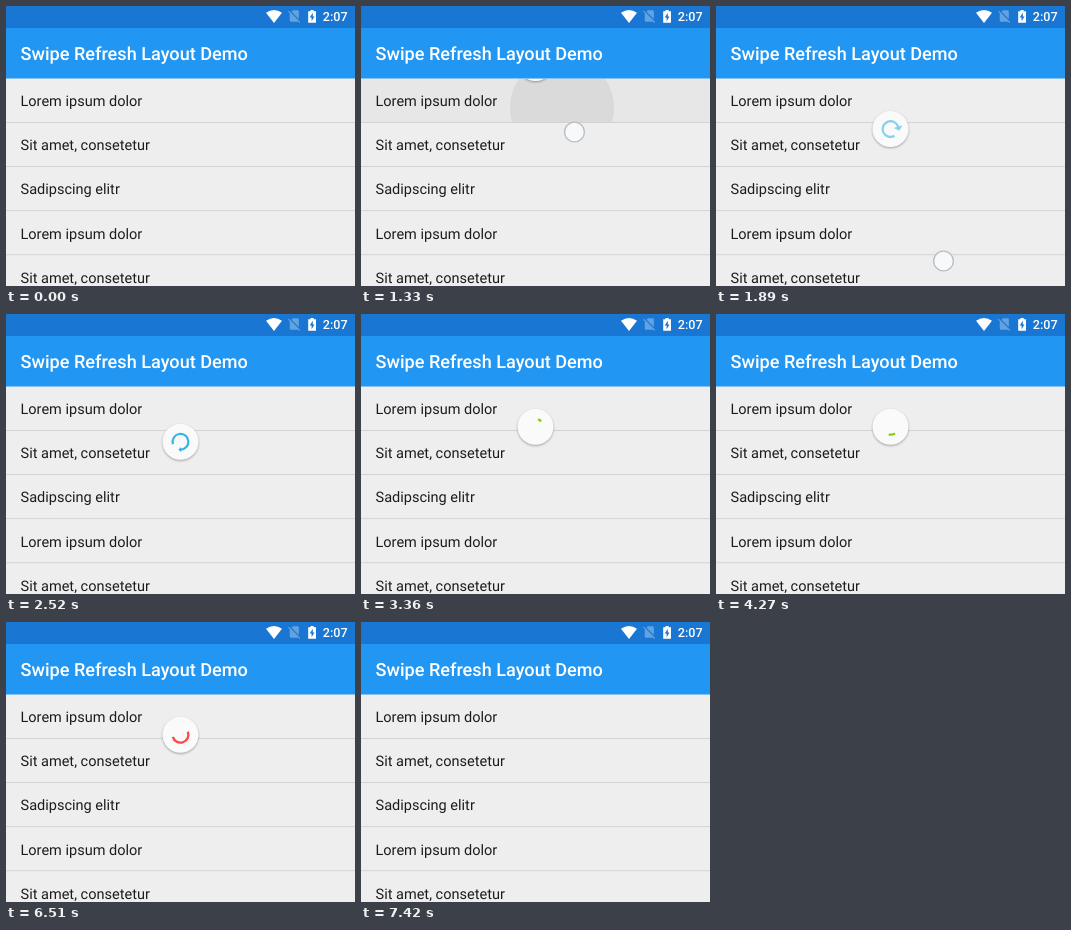
Recreate the animation shown at these times as an HTML page. Size 349x280 px, loop 8120 ms.

```html
<!DOCTYPE html>
<html lang="en">
<head>
<meta charset="utf-8">
<title>Swipe refresh</title>
<style>
  html, body { margin: 0; width: 100%; height: 100%; overflow: hidden; background: #eee; }
  svg { display: block; width: 100%; height: 100%; }
  text { font-family: Roboto, "Noto Sans", sans-serif; text-rendering: geometricPrecision; }
  .disc { filter: drop-shadow(0 1px 1px rgba(0, 0, 0, .32)); }
</style>
</head>
<body>
<svg viewBox="0 0 349 280">
  <defs>
    <clipPath id="listClip"><rect y="73" width="349" height="207"/></clipPath>
    <clipPath id="rowClip"><rect y="73" width="349" height="43"/></clipPath>
  </defs>
  <rect width="349" height="280" fill="#eee"/>
  <g id="press" clip-path="url(#rowClip)">
    <rect y="73" width="349" height="43" fill="#e7e7e7"/>
    <circle cx="201" cy="102" r="52" fill="#dadada"/>
  </g>
  <g id="rows" font-size="14.54" fill="#1c1c1c"></g>
  <g clip-path="url(#listClip)">
    <g id="spinner">
      <circle class="disc" r="18" fill="#fafafa"/>
      <g id="mark">
        <path id="arc" fill="none" stroke-width="2.25"/>
        <path id="arrow" d="M-4.5 0H4.5L0 4.5Z"/>
      </g>
    </g>
  </g>
  <rect y="22" width="349" height="50.5" fill="#2196f3"/>
  <rect width="349" height="22" fill="#1976d2"/>
  <text x="14.6" y="54.2" font-size="18.1" font-weight="500" fill="#fff">Swipe Refresh Layout Demo</text>
  <g fill="#fff">
    <path d="M268 17L260 6.7Q268 1.2 276 6.7Z"/>
    <path transform="translate(280.5 2.2) scale(.65)" opacity=".32"
      d="M19 5Q19 3 17 3H10L7.7 5.3L19 16.7ZM3.7 3.9L2.4 5.2L5 7.8V19Q5 21 7 21H17L18 20.7L19.9 22.6L21.1 21.4Z"/>
    <path d="M304.5 4H307.7V5.2H310V16.8H302.2V5.2H304.5Z"/>
    <path d="M306.8 6.8L303.7 11.6H305.6V15.2L308.5 10.4H306.8Z" fill="#1976d2"/>
    <text x="316.8" y="15.1" font-size="12.6" font-weight="500">2:07</text>
  </g>
  <circle id="touch" r="9.9" fill="#f8f9fa" fill-opacity=".9" stroke="#b8bfca" stroke-width="1.4"/>
</svg>
<script>
const LOOP = 8120, STEP = 70, TOUCH_DOWN = 1190;
const ROW = 44.1;
const HOME = 55, REST = 112.8, TRAVEL = REST - HOME;
const RELEASE = 2400, FINISH = 2690, SPIN = 3290, CYCLE = 1212;
const SHRINK = 7260, GONE = 7420;
const RADIUS = 7.9, SWEEP = 288, MIN_ARC = 16;
const COLORS = ["#33b5e5", "#88c80c", "#ffa63c", "#ff4444"];
const ROWS = ["Lorem ipsum dolor", "Sit amet, consetetur", "Sadipscing elitr"];
// time, x, y of the finger
const FINGER = [[1190, 212.5, 105.5], [1260, 212.5, 105.5], [1330, 213.5, 126],
  [1890, 227.5, 255], [2030, 229.5, 279], [2170, 229.5, 279], [2310, 229.5, 320]];

const $ = id => document.getElementById(id);
const clamp = v => Math.min(1, Math.max(0, v));
const mix = (a, b, u) => a + (b - a) * u;
const show = (el, on) => el.setAttribute("visibility", on ? "visible" : "hidden");

$("rows").innerHTML = Array.from({ length: 5 }, (_, i) =>
  `<text x="14.5" y="${100.2 + ROW * i}">${ROWS[i % 3]}</text>` +
  `<rect y="${116 + ROW * i}" width="349" height=".9" fill="#d1d1d1"/>`).join("");

// cubic-bezier(.4, 0, .2, 1)
function ease(x) {
  x = clamp(x);
  let lo = 0, hi = 1;
  for (let i = 0; i < 20; i++) {
    const u = (lo + hi) / 2, v = 1 - u;
    if (1.2 * v * v * u + 0.6 * v * u * u + u * u * u < x) lo = u; else hi = u;
  }
  return lo * lo * (3 - 2 * lo);
}

function fingerAt(t) {
  for (let i = 1; i < FINGER.length; i++) {
    const [t0, x0, y0] = FINGER[i - 1], [t1, x1, y1] = FINGER[i];
    if (t <= t1) {
      const u = clamp((t - t0) / (t1 - t0));
      return { x: mix(x0, x1, u), y: mix(y0, y1, u) };
    }
  }
  const [, x, y] = FINGER[FINGER.length - 1];
  return { x, y };
}

const pullY = y => 57 + (y - 126) * 0.512;

// ring shape while dragged: arc grows, then the whole ring turns
function pullRing(cy) {
  const p = (cy - HOME) / TRAVEL;
  const grown = clamp((Math.min(p, 1) - 0.4) * 5 / 3);
  const tension = Math.max(0, p - 1) / 2;
  const turn = (-0.25 + 0.4 * grown + 2 * tension) / 2;
  const tail = 90 + 360 * turn;
  return { turn, tail, head: tail + SWEEP * grown, arrow: grown };
}

function ringAt(t, cy) {
  if (t < RELEASE) return pullRing(cy);
  const held = pullRing(pullY(320));
  if (t < FINISH) return { ...held, arrow: 1 - (t - RELEASE) / (FINISH - RELEASE) };
  if (t < SPIN) {
    const u = (t - FINISH) / (SPIN - FINISH);
    const base = 90 + 360 * mix(held.turn, 1, u);
    return { tail: base + (SWEEP - MIN_ARC) * u, head: base + SWEEP, arrow: 0 };
  }
  const n = Math.floor((t - SPIN) / CYCLE), u = (t - SPIN) / CYCLE - n;
  const base = 2 + (SWEEP + 306) * n + 306 * u;
  return {
    tail: base + SWEEP * ease(2 * u - 1),
    head: base + MIN_ARC + SWEEP * ease(2 * u),
    arrow: 0, color: COLORS[(n + 1) % 4]
  };
}

function point(deg) {
  const a = deg * Math.PI / 180;
  return `${RADIUS * Math.sin(a)} ${-RADIUS * Math.cos(a)}`;
}

function drawSpinner(t) {
  const visible = t >= 1330 && t < GONE;
  show($("spinner"), visible);
  if (!visible) return;
  let cy = REST;
  if (t < RELEASE) cy = pullY(fingerAt(t).y);
  else if (t < FINISH) {
    const left = 1 - (t - RELEASE) / (FINISH - RELEASE);
    cy = mix(REST, pullY(320), left * left);
  }
  const scale = 1 - clamp((t - SHRINK) / (GONE - SHRINK));
  $("spinner").setAttribute("transform", `translate(174.5 ${cy}) scale(${scale})`);

  const { tail, head, arrow, color = COLORS[0] } = ringAt(t, cy);
  const long = head - tail > 180 ? 1 : 0;
  $("arc").setAttribute("d", head - tail < 0.5 ? "" :
    `M${point(tail)}A${RADIUS} ${RADIUS} 0 ${long} 1 ${point(head)}`);
  $("arc").setAttribute("stroke", color);
  $("arrow").setAttribute("fill", color);
  $("arrow").setAttribute("transform",
    `rotate(${head - 95}) translate(${RADIUS} 0) scale(${arrow})`);
  $("mark").setAttribute("opacity", mix(0.3, 1, clamp((t - 1770) / 300)));
}

function draw(ms) {
  let t = ms % LOOP;
  t = t < TOUCH_DOWN ? 0 : TOUCH_DOWN + Math.floor((t - TOUCH_DOWN) / STEP) * STEP;

  const finger = fingerAt(t);
  show($("touch"), t >= TOUCH_DOWN && t < 2310);
  $("touch").setAttribute("cx", finger.x);
  $("touch").setAttribute("cy", finger.y);

  show($("press"), t >= 1330 && t < 1540);
  $("press").setAttribute("opacity", 1 - clamp((t - 1330) / 210));

  drawSpinner(t);
}

const begin = performance.now();
function tick() {
  draw(performance.now() - begin);
  requestAnimationFrame(tick);
}
tick();
</script>
</body>
</html>
```
